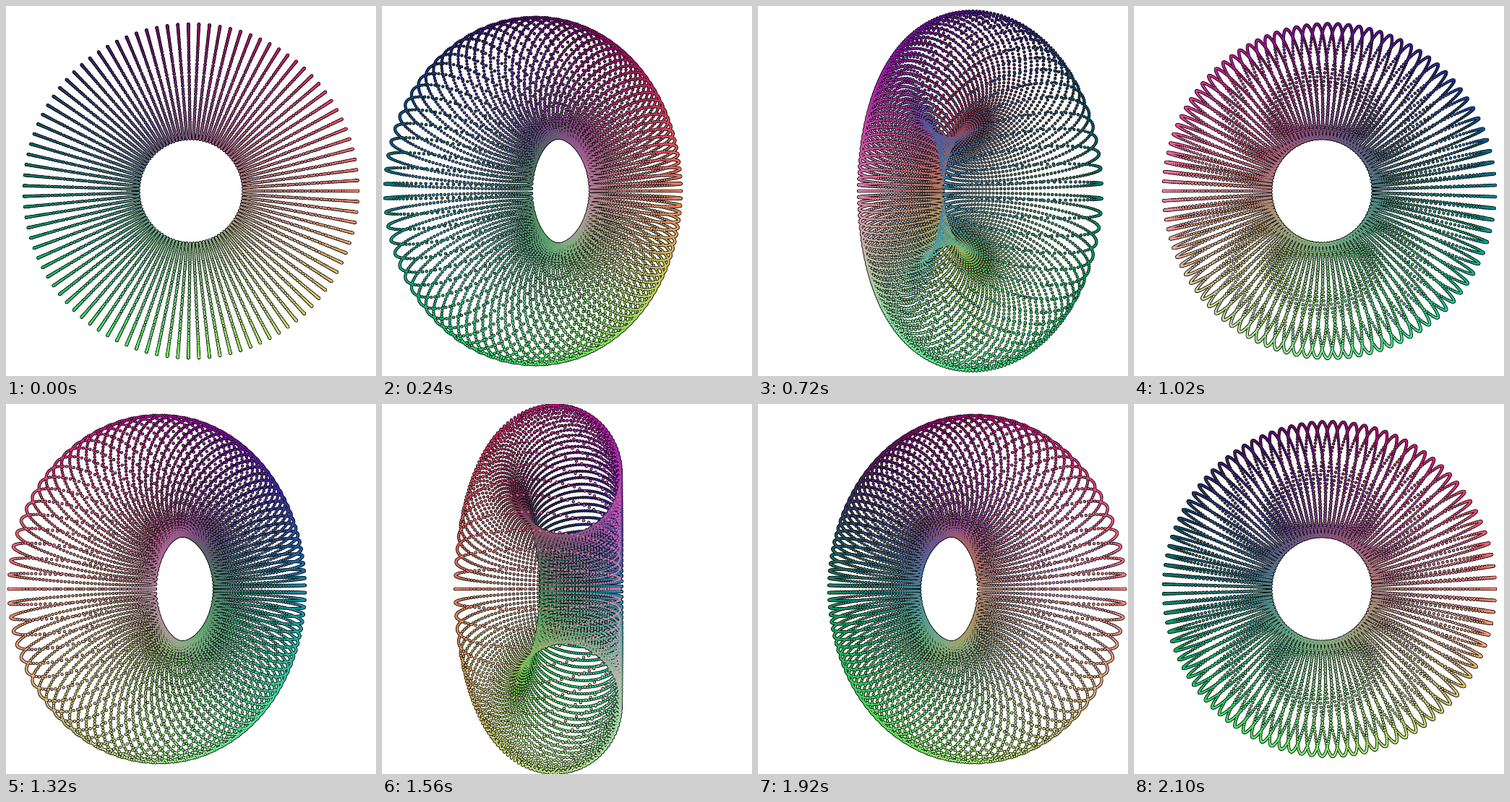
Recreate the animation shown at these times as an HTML page with a canvas. Size 512 by 512 pixels, loop 2.16 s.

```html
<!DOCTYPE html>
<html>
<head>
<meta charset="utf-8">
<style>
html, body { margin: 0; width: 100%; height: 100%; overflow: hidden; background: #fff; }
canvas { display: block; }
</style>
</head>
<body>
<canvas id="stage" width="512" height="512"></canvas>
<script>
const ctx = document.getElementById('stage').getContext('2d');
const STEP = 60, FRAMES = 36, COUNT = 99;
const MAJOR = 147.6, MINOR = 74;
const EYE = 256 / Math.tan(Math.PI / 6);
const TAU = Math.PI * 2;

const channel = p => Math.round(127.5 + 127.5 * p / (MAJOR + MINOR));

// Dots on a torus, each coloured by its own position
const dots = [];
for (let i = 0; i < COUNT; i++) {
  const u = i / COUNT * TAU;
  for (let j = 0; j < COUNT; j++) {
    const v = j / COUNT * TAU;
    const ring = MAJOR + MINOR * Math.cos(v);
    const x = ring * Math.cos(u), y = ring * Math.sin(u), z = MINOR * Math.sin(v);
    dots.push({ x, y, z, color: `rgb(${channel(x)},${channel(y)},${channel(-z)})` });
  }
}

function disc(x, y, radius, color) {
  ctx.fillStyle = color;
  ctx.beginPath();
  ctx.arc(x, y, radius, 0, TAU);
  ctx.fill();
}

function draw(frame) {
  const angle = frame / FRAMES * TAU;
  const c = Math.cos(angle), s = Math.sin(angle);
  ctx.fillStyle = '#fff';
  ctx.fillRect(0, 0, 512, 512);
  for (const d of dots) {
    d.depth = d.z * c - d.x * s;
    const k = EYE / (EYE - d.depth);
    d.px = 256 + (d.x * c + d.z * s) * k;
    d.py = 256 + d.y * k;
  }
  dots.sort((a, b) => a.depth - b.depth);
  // All outlines lie beneath all fills, so dense areas stay bright
  for (const d of dots) disc(d.px, d.py, 2.2, '#000');
  for (const d of dots) disc(d.px, d.py, 1.4, d.color);
}

const start = performance.now();
let shown = -1;
function tick() {
  const frame = Math.floor((performance.now() - start) / STEP) % FRAMES;
  if (frame !== shown) draw(shown = frame);
  requestAnimationFrame(tick);
}
tick();
</script>
</body>
</html>
```
